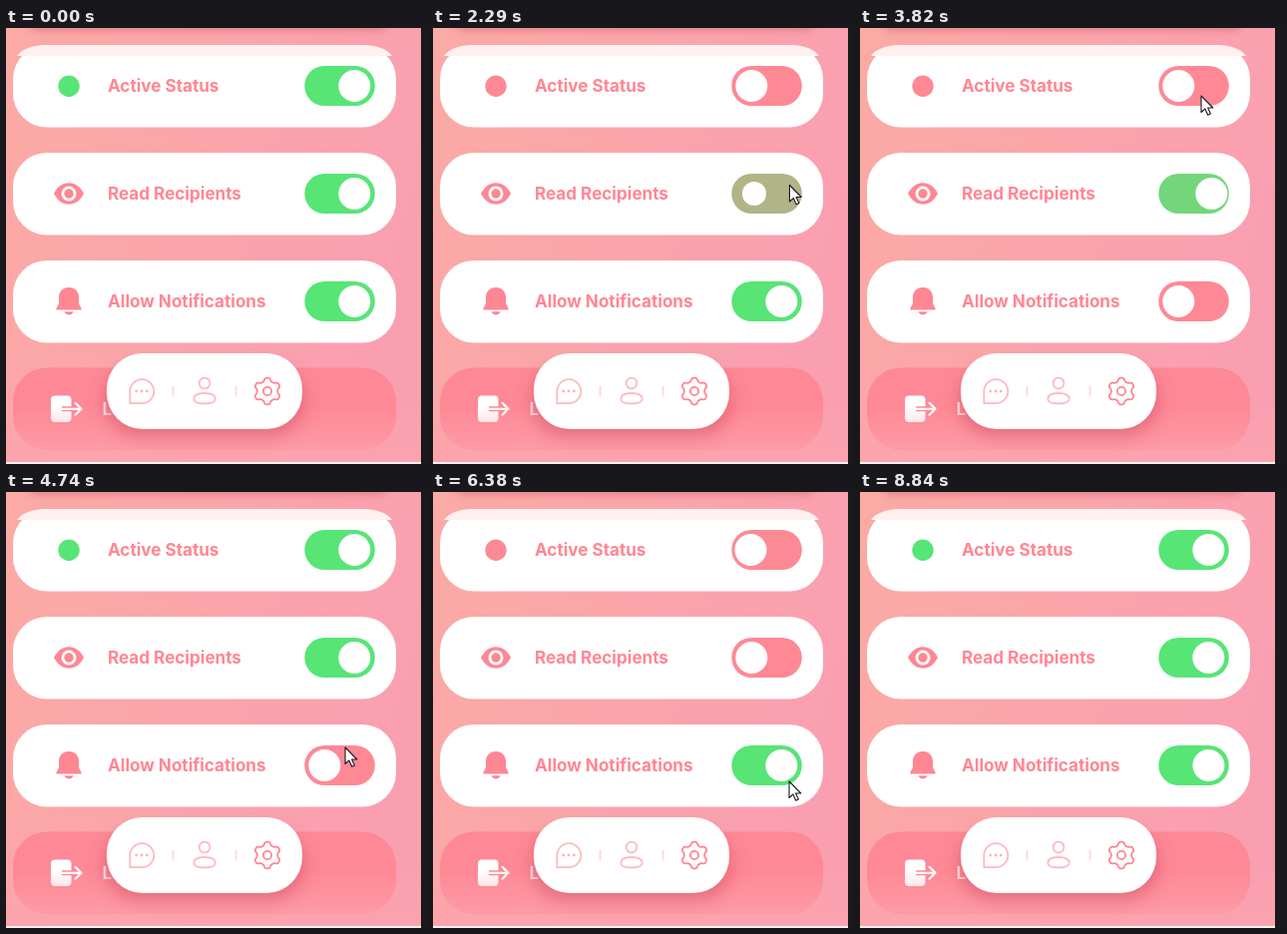
An HTML page for the animation above (9140 ms loop, 422 px wide and 437 px high).

```html
<!DOCTYPE html>
<html lang="en">
<head>
<meta charset="utf-8">
<title>Settings toggles</title>
<style>
  html, body { margin: 0; width: 100%; height: 100%; overflow: hidden; background: #fba5aa; }
  svg { display: block; width: 100vw; height: 100vh; }
  text { font: 700 17.1px Inter, "Open Sans", sans-serif; fill: #ff8693; }
  .pink { fill: #ff8693; }
  .line { fill: none; stroke-width: 1.8; stroke-linecap: round; stroke-linejoin: round; }
  .pale { stroke: #ffb9c1; }
</style>
</head>
<body>
<svg viewBox="0 0 422 437" preserveAspectRatio="none">
  <defs>
    <linearGradient id="bg" x1="0" y1="0" x2="1" y2=".35">
      <stop offset="0" stop-color="#fbaaa4"/>
      <stop offset=".5" stop-color="#fba5aa"/>
      <stop offset="1" stop-color="#fa9fb0"/>
    </linearGradient>
    <linearGradient id="fade" x1="0" y1="0" x2="0" y2="1">
      <stop offset="0" stop-color="#fda3ae" stop-opacity="0"/>
      <stop offset="1" stop-color="#fda3ae" stop-opacity=".85"/>
    </linearGradient>
    <filter id="soft" x="-30%" y="-60%" width="160%" height="220%">
      <feGaussianBlur stdDeviation="8"/>
    </filter>
    <filter id="edge" x="-10%" y="-100%" width="120%" height="300%">
      <feGaussianBlur stdDeviation="3"/>
    </filter>
  </defs>

  <rect width="422" height="437" fill="url(#bg)"/>
  <rect x="22" y="-16" width="362" height="20" rx="10" fill="#d9707c" opacity=".5" filter="url(#edge)"/>

  <g id="rows"></g>
  <path d="M11 28C16 21 26 17 41 17H357C372 17 382 21 387 28Z" fill="#fff0f1"/>

  <circle id="dot" cx="63" cy="58.3" r="10.7"/>
  <g>
    <path class="pink" d="M48 166C52 158.500 57 155.300 63 155.300S74 158.500 78 166C74 173.500 69 176.700 63 176.700S52 173.500 48 166Z"/>
    <circle cx="63" cy="166" r="7.5" fill="#fff"/>
    <circle class="pink" cx="63" cy="166" r="4.700"/>
  </g>
  <path class="pink" d="M63 260C69.500 260 73 264.500 73 270V275C73 278 75.800 279.500 75.800 282.500H50.200C50.200 279.500 53 278 53 275V270C53 264.500 56.500 260 63 260ZM58.500 284.300H67.500C66.500 286.800 65 287.500 63 287.500S59.500 286.800 58.500 284.300Z"/>

  <rect x="7" y="340.500" width="384" height="82.500" rx="34" fill="#fe8895"/>
  <rect x="45" y="368.500" width="20.500" height="26.500" rx="4" fill="#fff"/>
  <path class="line" d="M56 381.800H75M69.500 375.800L75.500 381.800L69.500 387.800" stroke="#fe8895" style="stroke-width:5;stroke-linecap:butt"/>
  <path class="line" d="M56 381.800H75M69.500 375.800L75.500 381.800L69.500 387.800" stroke="#fff" style="stroke-width:2.200"/>
  <text x="96.500" y="388" style="fill:#fff" opacity=".9">Logout</text>
  <rect y="378" width="416" height="57" fill="url(#fade)"/>
  <rect y="435" width="416" height="2" fill="#fff1f2"/>

  <rect x="98" y="338" width="202" height="72" rx="36" fill="#d04f60" opacity=".5" filter="url(#soft)"/>
  <rect x="101" y="326" width="196" height="76" rx="36" fill="#fff"/>
  <path class="line pale" d="M124.300 376.200V364A12 12 0 1 1 136.300 376.200Z"/>
  <g fill="#ffb0ba">
    <circle cx="130.700" cy="364" r="1.400"/><circle cx="136" cy="364" r="1.400"/><circle cx="141.300" cy="364" r="1.400"/>
  </g>
  <path class="line" d="M167.500 359.500V368.500M230.500 359.500V368.500" stroke="#ffd5da"/>
  <circle class="line pale" cx="199" cy="356" r="5.400"/>
  <path class="line pale" d="M188.300 372C188.300 368 193 366 199 366S209.700 368 209.700 372C209.700 375.300 206.500 376.500 199 376.500S188.300 375.300 188.300 372Z"/>
  <path id="gear" class="line" stroke="#ff8693"/>
  <circle class="line" cx="262" cy="364" r="4.100" stroke="#ff8693"/>

  <rect x="416" width="6" height="437" fill="#1a191b"/>
  <path id="cursor" d="M0 0V16.500L3.900 13L6.700 19.200L9.400 18L6.600 12H11.800Z" fill="#fff" stroke="#1b1b24" stroke-width="1.100" stroke-linejoin="round"/>
</svg>

<script>
const LOOP = 9140, FLIP = 400;
const PINK = [255, 136, 149], GREEN = [87, 229, 118];
const $ = id => document.getElementById(id);

// Each click flips its switch; all start on.
const rows = [
  { label: 'Active Status', y: 58, clicks: [1300, 4180, 6040, 7900] },
  { label: 'Read Recipients', y: 166, clicks: [2170, 3590, 5450, 7400] },
  { label: 'Allow Notifications', y: 274, clicks: [2900, 4890, 6640, 8460] }
];

// Cursor moves: start, end, control point, end point.
const ENTER = 610, LEAVE = 8840, ORIGIN = [424, 152];
const moves = [
  [610, 1140, 372, -12, 354, 50],
  [1320, 1930, 452, 85, 354, 146],
  [2190, 2720, 418, 358, 352, 270],
  [2910, 3430, 451, 215, 350, 160],
  [3560, 3820, 350, 110, 342, 68],
  [4200, 4740, 365, 380, 340, 256],
  [4910, 5250, 350, 215, 345, 170],
  [5470, 5860, 350, 110, 345, 53],
  [6060, 6380, 375, 180, 357, 290],
  [6380, 6490, 357, 283, 352, 274],
  [6660, 7060, 352, 215, 343, 163],
  [7260, 7680, 316, 115, 337, 55],
  [7900, 8270, 368, 385, 348, 274],
  [8470, 8840, 395, 330, 397, 440]
];

const lerp = (a, b, p) => a + (b - a) * p;
const clamp = v => Math.min(1, Math.max(0, v));
const easeInOut = s => s < .5 ? 4 * s ** 3 : 1 - 4 * (1 - s) ** 3;
const easeOut = s => 1 - (1 - s) ** 2.1;
const easeBack = s => 1 + 2.70158 * (s - 1) ** 3 + 1.70158 * (s - 1) ** 2;
const mix = p => `rgb(${PINK.map((c, i) => Math.round(lerp(c, GREEN[i], p)))})`;

function add(tag, attrs) {
  const el = document.createElementNS('http://www.w3.org/2000/svg', tag);
  for (const key in attrs) el.setAttribute(key, attrs[key]);
  return $('rows').appendChild(el);
}

for (const row of rows) {
  add('rect', { x: 7, y: row.y - 41, width: 384, height: 82.5, rx: 34, fill: '#fff' });
  add('text', { x: 102, y: row.y + 6.2 }).textContent = row.label;
  row.track = add('rect', { x: 299.3, y: row.y - 20, width: 70.5, height: 40, rx: 20 });
  row.knob = add('circle', { cy: row.y, fill: '#fff' });
}

const gear = [];
for (let i = 0; i < 120; i++) {
  const a = i * Math.PI / 60;
  const r = 11.8 - 1.6 * Math.tanh(1.6 * Math.cos(6 * a)) / Math.tanh(1.6);
  gear.push(`${(262 + r * Math.cos(a)).toFixed(2)} ${(364 + r * Math.sin(a)).toFixed(2)}`);
}
$('gear').setAttribute('d', `M${gear.join('L')}Z`);

function drawSwitch(row, t) {
  const past = row.clicks.filter(c => c <= t);
  const on = past.length % 2 === 0 ? 1 : 0;
  const s = past.length ? clamp((t - past[past.length - 1]) / FLIP) : 1;
  const squeeze = s < .3 ? s / .3 : clamp((.57 - s) / .27);
  const color = mix(lerp(1 - on, on, easeOut(s)));
  row.track.setAttribute('fill', color);
  row.knob.setAttribute('cx', lerp(319.3, 349.3, lerp(1 - on, on, easeBack(s))));
  row.knob.setAttribute('r', 16 - 4 * squeeze);
  return color;
}

function cursorAt(t) {
  let [x, y] = ORIGIN;
  for (const [start, end, cx, cy, ex, ey] of moves) {
    if (t < start) break;
    const p = easeInOut(clamp((t - start) / (end - start)));
    x = lerp(lerp(x, cx, p), lerp(cx, ex, p), p);
    y = lerp(lerp(y, cy, p), lerp(cy, ey, p), p);
  }
  return [x, y];
}

function draw() {
  const t = performance.now() % LOOP;
  const colors = rows.map(row => drawSwitch(row, t));
  $('dot').setAttribute('fill', colors[0]);
  $('cursor').setAttribute('transform', `translate(${cursorAt(t)})`);
  $('cursor').setAttribute('visibility', t >= ENTER && t < LEAVE ? 'visible' : 'hidden');
  requestAnimationFrame(draw);
}
draw();
</script>
</body>
</html>
```
